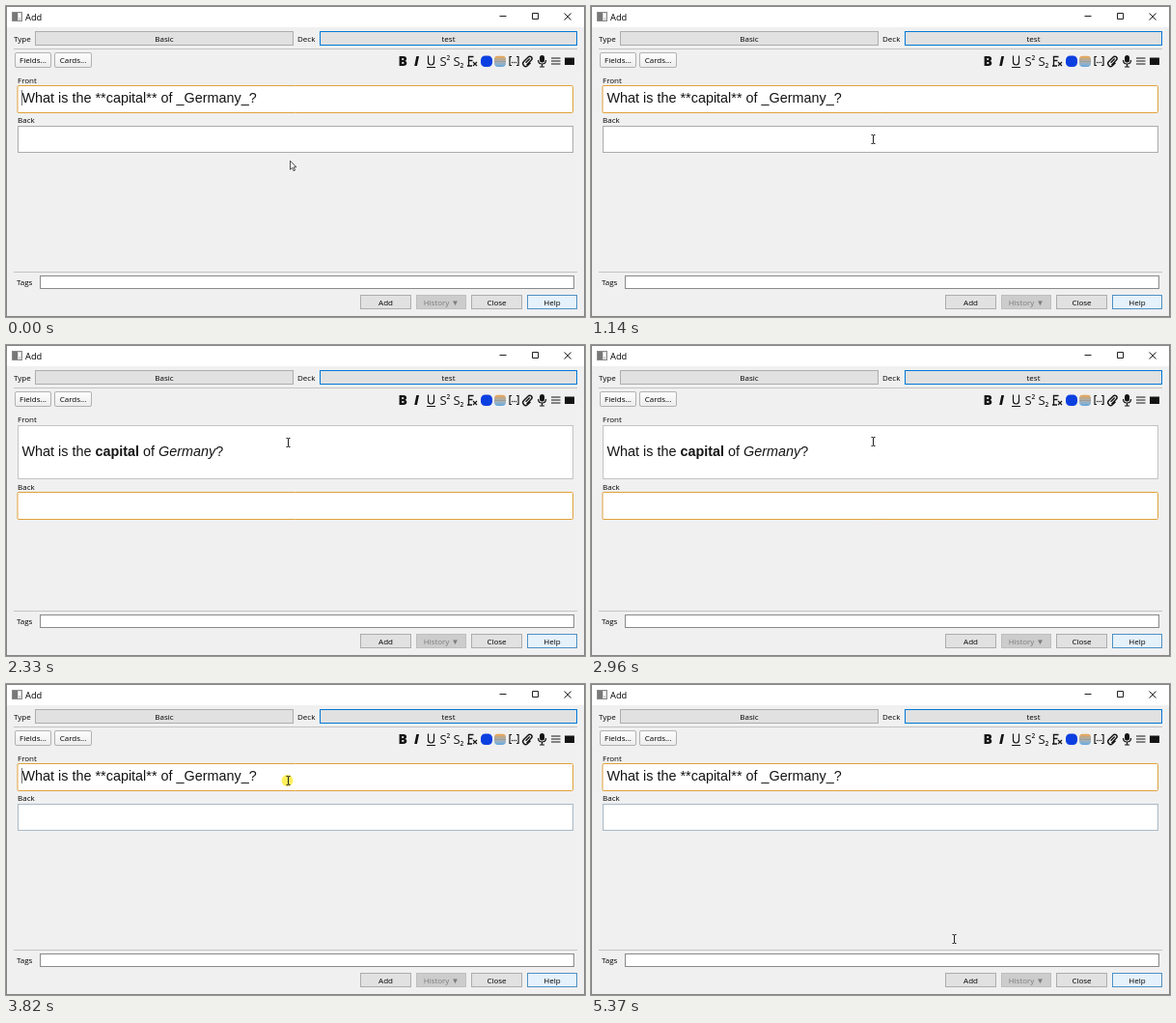
These frames come from a looping animation (600 by 322 pixels, 5.5 s). An HTML page with a canvas:

```html
<!DOCTYPE html>
<html lang="en">
<head>
<meta charset="utf-8">
<title>Add</title>
<style>
  html, body { margin: 0; width: 100%; height: 100%; overflow: hidden; background: #f0f0f0; }
  canvas { display: block; width: 600px; height: 322px; }
</style>
</head>
<body>
<canvas id="stage" width="600" height="322"></canvas>
<script>
const ctx = document.getElementById('stage').getContext('2d');
const LOOP = 5500;
const UI = '"Open Sans", "Noto Sans", sans-serif';
const BODY = '"Liberation Sans", Arial, sans-serif';
const INK = '#141414';

// [start, shape, x, y]
const pointer = [
  [0, 'arrow', 294, 160], [890, 'arrow', 294, 157], [950, 'arrow', 293, 153],
  [1010, 'beam', 292, 144], [1070, 'beam', 292, 140], [1140, 'beam', 292, 138],
  [1390, 'beam', 292, 137], [2210, 'beam', 292, 130], [2270, 'beam', 292, 112],
  [2330, 'beam', 292, 101], [2650, 'beam', 292, 100],
  [4270, 'beam', 340, 194], [4320, 'beam', 376, 264]
];
// Each entry flips the caret, which starts visible.
const caretFlips = [70, 570, 1070, 1390, 1890, 2400, 2960, 3520, 4320, 4880, 5370];
const between = (t, from, to) => t >= from && t < to;

function rect(x, y, w, h, fill, stroke, width = 1) {
  if (fill) { ctx.fillStyle = fill; ctx.fillRect(x, y, w, h); }
  if (stroke) {
    ctx.strokeStyle = stroke;
    ctx.lineWidth = width;
    ctx.strokeRect(x + .5, y + .5, w - 1, h - 1);
  }
}

function rounded(x, y, w, h, r, fill, stroke) {
  ctx.beginPath();
  ctx.roundRect(x, y, w, h, r);
  if (fill) { ctx.fillStyle = fill; ctx.fill(); }
  if (stroke) { ctx.strokeStyle = stroke; ctx.lineWidth = 1; ctx.stroke(); }
}

function text(str, x, y, font = `8px ${UI}`, color = '#000', align = 'left') {
  ctx.font = font;
  ctx.fillStyle = color;
  ctx.textAlign = align;
  ctx.fillText(str, x, y);
  return ctx.measureText(str).width;
}

function path(d, color = INK, width = 1, fill) {
  const p = new Path2D(d);
  if (fill) { ctx.fillStyle = fill; ctx.fill(p); }
  if (color) { ctx.strokeStyle = color; ctx.lineWidth = width; ctx.stroke(p); }
}

function disc(x, y, r, fill) {
  ctx.beginPath();
  ctx.arc(x, y, r, 0, Math.PI * 2);
  ctx.fillStyle = fill;
  ctx.fill();
}

function button(label, x, y, w, h, fill = '#e1e1e1', stroke = '#adadad', color = '#000') {
  rect(x, y, w, h, fill, stroke);
  text(label, x + w / 2, y + h / 2 + 3, undefined, color, 'center');
}

function softButton(label, x, w) {
  const g = ctx.createLinearGradient(0, 48, 0, 64);
  g.addColorStop(0, '#ffffff');
  g.addColorStop(1, '#ebebeb');
  rounded(x + .5, 48.5, w - 1, 15, 1.5, g, '#b2b2b2');
  text(label, x + w / 2, 59, undefined, '#000', 'center');
}

function titleBar() {
  rect(0, 0, 600, 22, '#fff');
  rect(6, 6, 11, 10, '#d8d8d8', '#8b8b8b');
  rect(7, 7, 5, 8, '#777');
  rect(13, 8, 2, 4, '#fff');
  text('Add', 20, 14.5, `9.3px ${UI}`);
  path('M511.5 10.5h7M545.5 7.5h6v6h-6zM578.5 7.5l7 7m0-7l-7 7', '#222');
}

function toolbar() {
  softButton('Fields...', 9, 38);
  softButton('Cards...', 50, 39);

  text('B', 406.5, 62, `800 14px ${UI}`, INK);
  text('I', 423, 62, `italic 800 14px ${UI}`, INK);
  path('M437.5 51.5v6.5q0 3 3 3t3-3v-6.5M436 63.5h9', INK, 1.2);
  text('S', 449.5, 62, `13px ${UI}`, INK);
  text('2', 456.5, 56, `600 6.5px ${UI}`, INK);
  text('S', 463.5, 62, `13px ${UI}`, INK);
  text('2', 470.5, 63.5, `600 6.5px ${UI}`, INK);
  path('M479.5 61.5v-9h5M479.5 56.5h4M478 62h5', INK, 1.3);
  path('M484 58l4 4m0-4l-4 4', INK, 1.1);

  rounded(492, 51.5, 12, 11.5, 4.5, '#0c3fe0');
  ctx.save();
  ctx.beginPath();
  ctx.roundRect(506, 51.5, 12, 11.5, 4);
  ctx.clip();
  ['#e2a45c', '#b9a98f', '#9c9c96', '#8fb0c8', '#6ba6d8'].forEach((c, i) =>
    rect(506, 51.5 + i * 2.4, 12, 2.4, c));
  ctx.restore();

  path('M524 52.5h-2v9h2M529 52.5h2v9h-2', INK, 1.2);
  [524.5, 526.5, 528.5].forEach(x => disc(x, 58.5, .65, INK));

  ctx.save();
  ctx.translate(541, 57);
  ctx.rotate(-.8);
  path('M-4 1.8h7a2 2 0 0 0 0-4.6h-6.5a2.9 2.9 0 0 0 0 5.8h4M3-.5h-6', INK, 1.4);
  ctx.restore();

  rounded(553, 51, 5, 7.5, 2.5, INK);
  path('M551.5 56q0 4 4 4t4-4M555.5 60v3M553 63h5', INK, 1.2);
  path('M565 54h9.5M565 57h9.5M565 60h9.5', INK, 1.2);
  rect(579, 53.5, 10, 7.5, INK);
}

function field(y, h, focused, idle) {
  if (focused) {
    rounded(12, y - .5, 575.5, h, 1, '#fff', '#e0a23c');
  } else {
    rect(12, y, 576, h, '#fff', idle);
  }
}

function plainQuestion() {
  text('What is the **capital** of _Germany_?', 16.5, 100, `14.4px ${BODY}`, INK);
}

function styledQuestion() {
  let x = 16.5;
  [['', 'What is the '], ['bold ', 'capital'], ['', ' of '], ['italic ', 'Germany'], ['', '?']]
    .forEach(([style, part]) => {
      x += text(part, x, 114.5, `${style}14.4px ${BODY}`, INK);
    });
}

function editor(t) {
  const onBack = between(t, 1390, 3820);
  text('Front', 12, 79.5);
  text('Back', 12, onBack ? 149.5 : 121);
  if (onBack) {
    field(83, 56, false, '#c3c3c3');
    field(153, 28, true);
    styledQuestion();
  } else {
    field(83, 28, true);
    field(124, 28, false, t >= 3820 ? '#a9b9c6' : '#ababab');
    plainQuestion();
  }
  const flips = caretFlips.filter(at => at <= t).length;
  if (flips % 2 === 0) rect(16, onBack ? 157 : 87, 1, 16, '#777');
}

function footer() {
  rect(8, 275, 584, 1, '#c4c4c4');
  text('Tags', 11, 289);
  rect(35, 279, 554, 14, '#fff', '#8a8a8a');
  button('Add', 367, 299, 53, 15);
  button('History ▼', 425, 299, 52, 15, '#cccccc', '#bfbfbf', '#7d7d7d');
  button('Close', 482, 299, 53, 15);
  button('Help', 540, 299, 52, 15, '#e5f1fb', '#4e91c4');
}

function cursor(t) {
  const [, shape, x, y] = pointer.filter(p => p[0] <= t).pop();
  if (between(t, 1390, 1470)) disc(x - .5, y + .5, 6.5, 'rgba(238,215,85,.72)');
  if (between(t, 3770, 3950)) disc(x - .5, y, 6, '#fff05a');
  ctx.save();
  ctx.translate(x, y);
  if (shape === 'arrow') {
    path('M.5 .3v9l2.1-2 1.5 3.4 1.5-.7-1.5-3.2h2.8z', '#222', .8, '#fff');
  } else {
    path('M-1.5-4.5h1.5l.5.5.5-.5h1.5M.5-4v8M-1.5 4.5h1.5l.5-.5.5.5h1.5', '#222', 1);
  }
  ctx.restore();
}

function draw(t) {
  rect(0, 0, 600, 322, '#f0f0f0');
  titleBar();
  text('Type', 8, 37);
  button('Basic', 30, 26, 268, 15);
  text('Deck', 302, 37);
  button('test', 325, 26, 267, 15, '#e1e1e1', '#0078d7');
  rect(8, 44, 584, 1, '#c4c4c4');
  toolbar();
  editor(t);
  footer();
  rect(0, 0, 600, 322, null, '#858585');
  cursor(t);
}

const start = performance.now();
function tick() {
  draw((performance.now() - start) % LOOP);
  requestAnimationFrame(tick);
}
tick();
</script>
</body>
</html>
```
